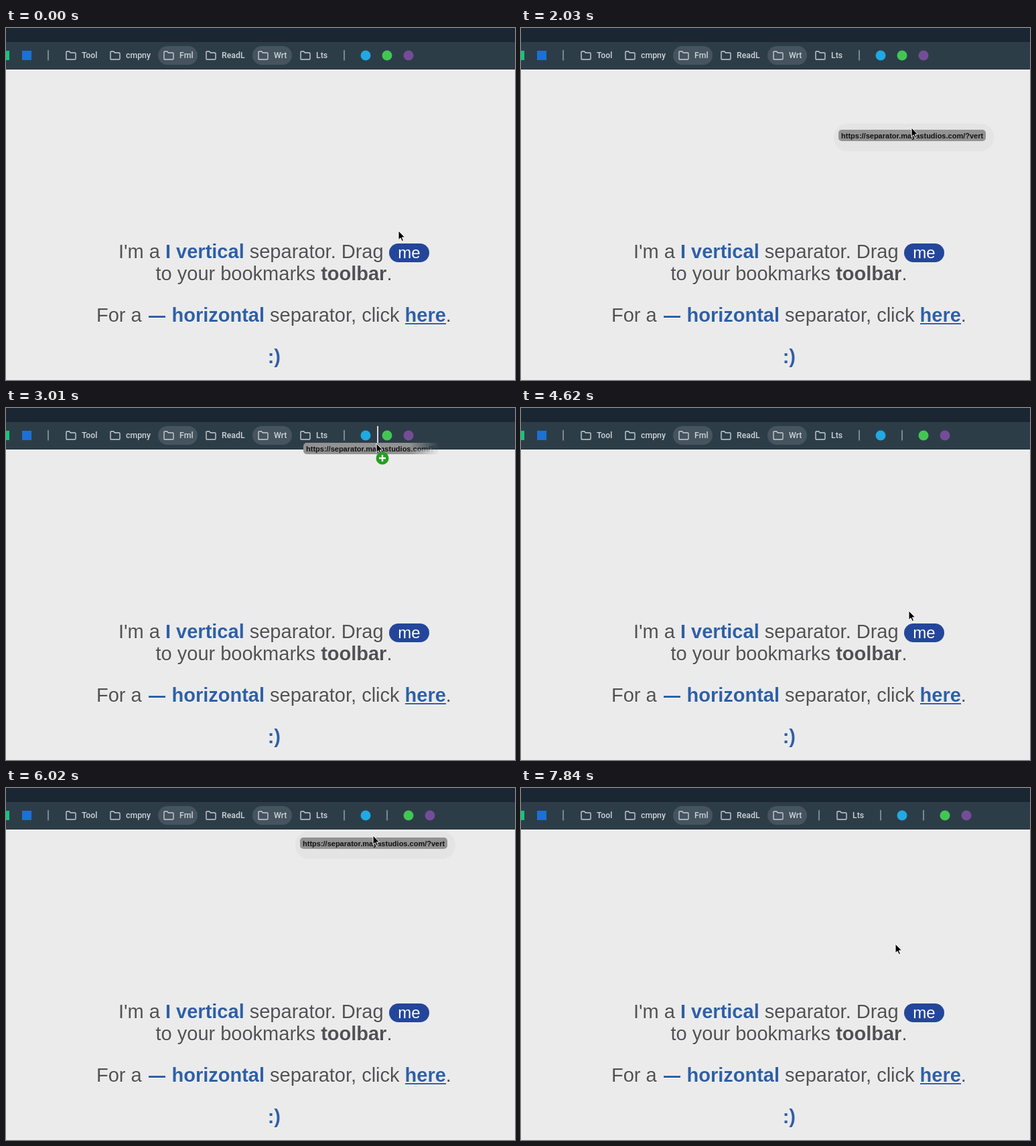
These frames come from a looping animation (760x526 px, 7.91 s). An HTML page:

```html
<!DOCTYPE html>
<html lang="en">
<head>
<meta charset="utf-8">
<title>Bookmark separator</title>
<style>
  html, body { margin: 0; width: 100%; height: 100%; overflow: hidden; background: #ebebeb; }
  svg { display: block; width: 760px; height: 526px; }
  .copy { font: 29px "Liberation Sans", Arial, sans-serif; fill: #515154; filter: drop-shadow(0 1px 0 #fff); }
  .bold { font-weight: 700; }
  .blue { font-weight: 700; fill: #2f5fa5; }
  .me { font: 24px "Liberation Sans", Arial, sans-serif; fill: #fff; }
  .bar { font: 500 12.3px Roboto, sans-serif; fill: #cdd4d8; }
  .url { font: 700 11px "Liberation Sans", Arial, sans-serif; fill: #111; }
</style>
</head>
<body>
<svg viewBox="0 0 760 526">
  <defs>
    <path id="folder" d="M1 2.2Q1 1 2.2 1H5.6L7.4 3H13.8Q15 3 15 4.2V11.8Q15 13 13.8 13H2.2Q1 13 1 11.8Z"
      fill="none" stroke="#c6ced2" stroke-width="1.4"/>
    <linearGradient id="fade" gradientUnits="userSpaceOnUse" x1="-109" x2="111" y1="0" y2="0">
      <stop offset=".72" stop-color="#fff"/>
      <stop offset=".92" stop-color="#fff" stop-opacity="0"/>
    </linearGradient>
    <mask id="fadeMask" maskUnits="userSpaceOnUse" x="-120" y="-10" width="250" height="50">
      <rect x="-120" y="-10" width="250" height="50" fill="url(#fade)"/>
    </mask>
  </defs>

  <rect width="760" height="526" fill="#ebebeb"/>
  <rect width="760" height="62" fill="#2d3d48"/>
  <rect width="760" height="21" fill="#1a2632"/>
  <rect y="61" width="760" height="1" fill="#24323c"/>
  <g id="toolbar"></g>

  <g class="copy">
    <text x="168" y="344">I'm a <tspan class="blue">I vertical</tspan> separator. Drag</text>
    <text x="400" y="377" text-anchor="middle">to your bookmarks <tspan class="bold">toolbar</tspan>.</text>
    <text x="135" y="439">For a</text>
    <rect x="213" y="430" width="25" height="3" fill="#2f5fa5"/>
    <text x="247.5" y="439"><tspan class="blue">horizontal</tspan> separator, click <tspan class="blue">here</tspan>.</text>
    <rect x="596" y="441" width="61" height="2" fill="#2f5fa5"/>
    <text class="blue" x="400.3" y="501" text-anchor="middle">:)</text>
  </g>
  <rect x="572" y="322" width="60" height="28" rx="14" fill="#24469a"/>
  <text class="me" x="602" y="343.5" text-anchor="middle">me</text>

  <rect id="marker" y="27" width="2" height="26" fill="#d5dbde"/>
  <g id="pointer">
    <g id="drag">
      <rect id="halo" x="-116" y="-6" width="239" height="41" rx="20" fill="#000" opacity=".03"/>
      <g id="label">
        <rect x="-109" y="3" width="220" height="17" rx="5" fill="#929292"/>
        <text class="url" x="-105" y="15.8">https://separator.mayastudios.com/?vert</text>
      </g>
    </g>
    <path d="M0 0V13.6L3.1 10.8L5.2 15.6L7.5 14.6L5.4 9.9H9.6Z" fill="#000" stroke="#fff" stroke-width="1" stroke-linejoin="round"/>
    <g id="badge" transform="translate(9 22)">
      <circle r="9.5" fill="#23a01f"/>
      <path d="M-5 0H5M0 -5V5" stroke="#fff" stroke-width="2.4"/>
    </g>
  </g>
</svg>
<script>
const LOOP = 7910, STEP = 70;
const DRAGS = [[1680, 3290], [5040, 6790]];
const GAPS = [85, 150, 224, 292, 366, 431, 489, 523, 555, 587];

// Pointer path: time, x, y
const PATH = [
  [0, 586, 303], [700, 585, 333], [1640, 584, 334], [2030, 583, 149],
  [2520, 568, 75], [3010, 553, 53], [3430, 553, 50], [4620, 579, 303],
  [4830, 585, 333], [5040, 585, 334], [5600, 588, 159], [5950, 560, 78],
  [6510, 428, 42], [6930, 430, 43], [7700, 559, 233], [7910, 559, 233]
];

const $ = id => document.getElementById(id);
const show = (node, on) => node.setAttribute("display", on ? "inline" : "none");

function add(markup) {
  const g = document.createElementNS("http://www.w3.org/2000/svg", "g");
  g.innerHTML = markup;
  return $("toolbar").appendChild(g);
}

const separator = x => add(`<rect x="${x - 0.8}" y="33" width="1.6" height="15.5" fill="#929b9f"/>`);
const disc = (x, color) => add(`<circle cx="${x}" cy="41" r="7.5" fill="${color}"/>`);
const square = (x, color) => add(`<rect x="${x}" y="34" width="14" height="14" fill="${color}"/>`);

function folder(x, name, active) {
  const pill = active ? `<rect x="${x - 8}" y="27" width="59" height="28" rx="14" fill="#45545e"/>` : "";
  return add(`${pill}<use href="#folder" x="${x}" y="34"/><text class="bar" x="${x + 24}" y="45">${name}</text>`);
}

square(-9, "#12c77c");
square(24, "#1c70d6");
separator(63);
folder(89, "Tool");
folder(155, "cmpny");
folder(235, "Fml", true);
folder(298, "ReadL");
folder(376, "Wrt", true);
const middle = [folder(439, "Lts"), separator(505), disc(537, "#20a9e2")];
const right = [disc(569, "#42c653"), disc(601, "#754c98")];
const firstDrop = separator(569);
const secondDrop = separator(445);

// Slope at a key, flat where the motion turns or rests
function slope(i, axis) {
  if (i === 0 || i === PATH.length - 1) return 0;
  const rate = j => (PATH[j + 1][axis] - PATH[j][axis]) / (PATH[j + 1][0] - PATH[j][0]);
  const a = rate(i - 1), b = rate(i);
  return a * b <= 0 ? 0 : 2 * a * b / (a + b);
}

function position(t, axis) {
  const i = Math.max(0, PATH.findIndex(key => key[0] > t) - 1);
  const a = PATH[i], b = PATH[i + 1], span = b[0] - a[0];
  const u = (t - a[0]) / span, v = 1 - u;
  return a[axis] * v * v * (1 + 2 * u) + b[axis] * u * u * (3 - 2 * u)
    + span * u * v * (slope(i, axis) * v - slope(i + 1, axis) * u);
}

const moveTo = (node, x, y = 0) => node.setAttribute("transform", `translate(${x} ${y})`);
const shift = (nodes, dx) => nodes.forEach(node => moveTo(node, dx));

function render(t) {
  const x = Math.round(position(t, 1)), y = Math.round(position(t, 2));
  const dragging = DRAGS.some(([from, to]) => t >= from && t < to);
  const over = dragging && y < 62;
  const drops = DRAGS.map(d => t >= d[1]);
  const secondShift = drops[1] ? 32 : 0;

  shift([...middle, firstDrop], secondShift);
  shift(right, secondShift + (drops[0] ? 32 : 0));
  show(firstDrop, drops[0]);
  show(secondDrop, drops[1]);

  moveTo($("pointer"), x, y);
  show($("drag"), dragging);
  show($("halo"), !over);
  show($("badge"), over);
  show($("marker"), over);
  // Over the toolbar the label sits higher and fades out to the right
  moveTo($("label"), 0, over ? -4 : 0);
  $("label").setAttribute("mask", over ? "url(#fadeMask)" : "none");
  const gap = GAPS.reduce((best, g) => Math.abs(g - x) < Math.abs(best - x) ? g : best);
  $("marker").setAttribute("x", gap - 1);
}

const start = performance.now();
function tick() {
  const t = (performance.now() - start) % LOOP;
  render(Math.floor(t / STEP) * STEP);
  requestAnimationFrame(tick);
}
tick();
</script>
</body>
</html>
```
